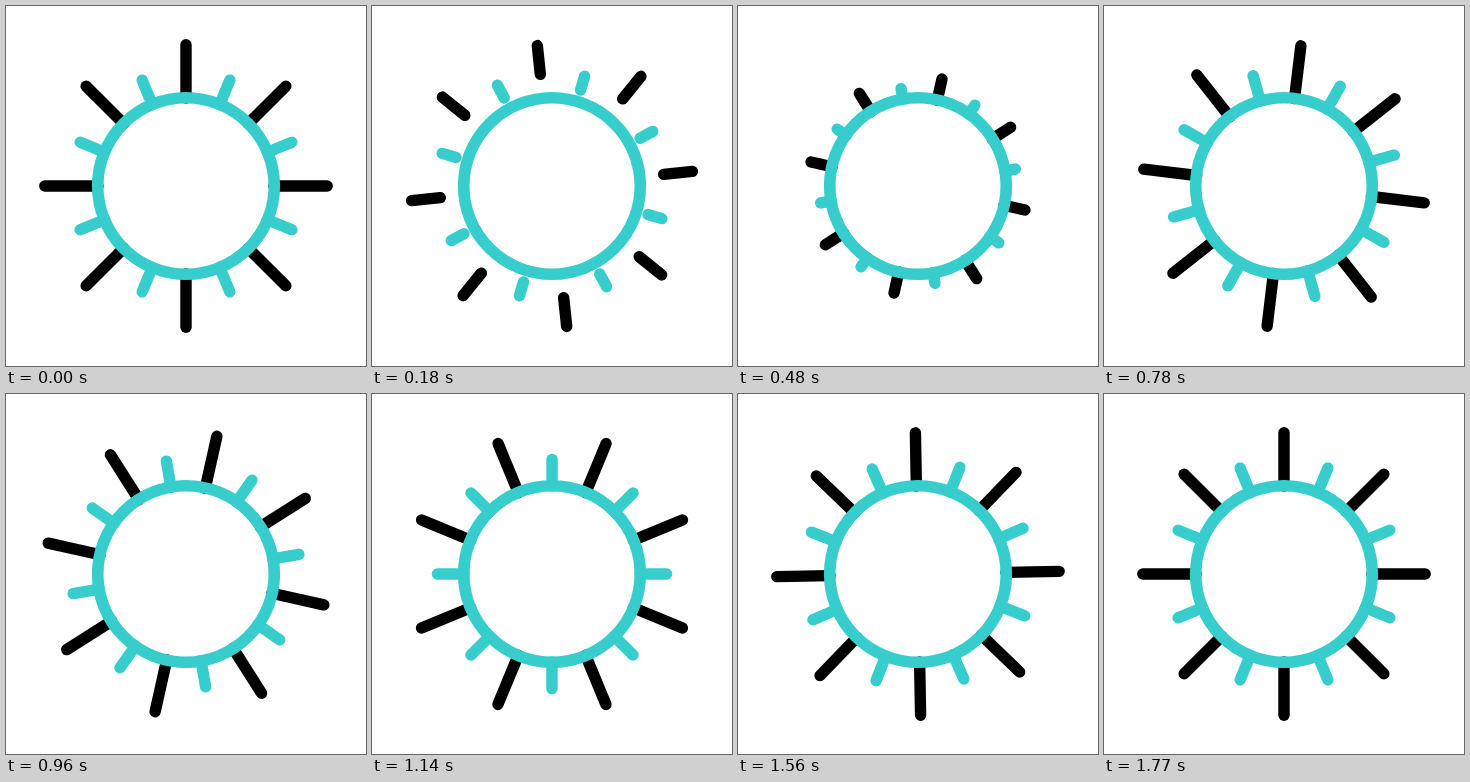
An HTML page without scripts that plays this animation: 360 px wide and 360 px high, repeating every 1.8 s.

```html
<!DOCTYPE html>
<html lang="en">
<head>
<meta charset="utf-8">
<title>Sun</title>
<style>
  @property --slot { syntax: "<number>"; inherits: true; initial-value: 0; }
  @property --held { syntax: "<number>"; inherits: true; initial-value: 0; }

  html, body { margin: 0; width: 100%; height: 100%; overflow: hidden; background: #fff; }
  svg { display: block; width: 100vw; height: 100vh; }

  /* 30 ms slots; every sixth pose is held for two of them */
  .sun {
    --pose: calc(var(--slot) - var(--held));
    animation: slot 1800ms steps(60) infinite, held 1800ms steps(10) 30ms infinite;
  }
  @keyframes slot { from { --slot: 0; } to { --slot: 60; } }
  @keyframes held { from { --held: 0; } to { --held: 10; } }

  /* eased turn: there and back */
  .spin {
    --a: clamp(0, (var(--pose) - 2) / 16.1, 1);
    --b: clamp(0, (var(--pose) - 20.3) / 26.3, 1);
    --there: calc(var(--a) * var(--a) * (3 - 2 * var(--a)));
    --back: calc(var(--b) * var(--b) * (3 - 2 * var(--b)));
    transform: rotate(calc(-38.6deg * (var(--there) - var(--back))));
  }

  /* rays leave outwards, then grow again from the ring */
  .rays {
    --c: clamp(0, (var(--pose) - 2) / 8.5, 1);
    --d: clamp(0, (var(--pose) - 10.5) / 8, 1);
    --out: calc(var(--c) * var(--c) * (3 - 2 * var(--c)));
    --in: calc(var(--d) * var(--d) * (3 - 2 * var(--d)));
    stroke-width: 11.4;
    stroke-linecap: round;
    stroke-dasharray: 100 100;
    stroke-dashoffset: calc(-100px * (var(--out) + var(--in)));
  }
  .long { stroke: #000; }
  .short, .ring { stroke: #37cdcc; }
  .ring { fill: none; stroke-width: 11.6; }
</style>
</head>
<body>
<svg viewBox="0 0 360 360">
  <defs>
    <g id="pair">
      <path class="long" pathLength="100" d="M0-88V-141.2"/>
      <path class="short" pathLength="100" d="M0-88V-114.6" transform="rotate(22.5)"/>
    </g>
  </defs>
  <g class="sun" transform="translate(180 180)">
    <g class="spin">
      <g class="rays">
        <use href="#pair"/>
        <use href="#pair" transform="rotate(45)"/>
        <use href="#pair" transform="rotate(90)"/>
        <use href="#pair" transform="rotate(135)"/>
        <use href="#pair" transform="rotate(180)"/>
        <use href="#pair" transform="rotate(225)"/>
        <use href="#pair" transform="rotate(270)"/>
        <use href="#pair" transform="rotate(315)"/>
      </g>
    </g>
    <circle class="ring" r="88.3"/>
  </g>
</svg>
</body>
</html>
```
